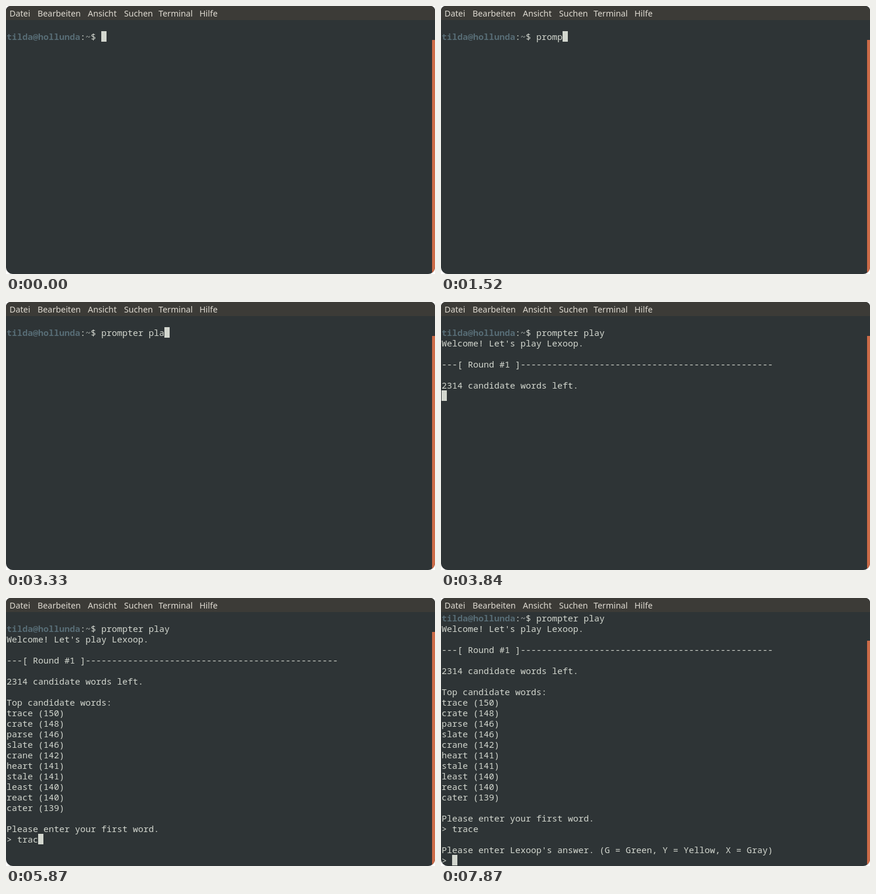
These frames come from a looping animation (734 by 458 pixels, 8000 ms). An HTML page with a canvas:

```html
<!DOCTYPE html>
<html lang="de">
<head>
<meta charset="utf-8">
<title>Terminal</title>
<style>
  html, body { margin: 0; width: 734px; height: 458px; overflow: hidden; background: #fff; }
  canvas { display: block; }
</style>
</head>
<body>
<canvas id="stage" width="734" height="458"></canvas>
<script>
const ctx = document.getElementById('stage').getContext('2d');
const LOOP = 8000, CELL = 9, ROW = 18, TOP = 25;
const MONO = '15px "Noto Sans Mono", monospace';
const TEXT = '#d3d7cf', PROMPT = '#576c75';

const MENU = [['Datei', 6], ['Bearbeiten', 54], ['Ansicht', 140],
              ['Suchen', 202], ['Terminal', 261], ['Hilfe', 331]];
const HOST = 'tilda@hollunda';

// Moment of each key press
const COMMAND = 'prompter play';
const COMMAND_KEYS = [760, 1010, 1260, 1520, 1520, 1780, 2040, 2300, 2560, 2820, 3070, 3330, 3580];
const GUESS = 'trace';
const GUESS_KEYS = [5100, 5350, 5600, 5860, 6120];
const START = 3840, LIST = 4100, ANSWER = 6370;

// Spans in which the cursor is blinked off
const HIDDEN = [[510, 760], [4600, 5100], [7120, 7870]];

const WELCOME = ["Welcome! Let's play Lexoop.", '',
  '---[ Round #1 ]' + '-'.repeat(48), '', '2314 candidate words left.', ''];
const CANDIDATES = ['Top candidate words:',
  'trace (150)', 'crate (148)', 'parse (146)', 'slate (146)', 'crane (142)',
  'heart (141)', 'stale (141)', 'least (140)', 'react (140)', 'cater (139)',
  '', 'Please enter your first word.'];
const QUESTION = ['', "Please enter Lexoop's answer. (G = Green, Y = Yellow, X = Gray)", '> '];

const typed = (word, keys, t) => word.slice(0, keys.filter(k => t >= k).length);

function screenLines(t) {
  const lines = ['', HOST + ':~$ ' + typed(COMMAND, COMMAND_KEYS, t)];
  if (t >= START) lines.push(...WELCOME);
  if (t >= LIST) lines.push(...CANDIDATES, '> ' + typed(GUESS, GUESS_KEYS, t));
  else if (t >= START) lines[lines.length - 1] = '';
  if (t >= ANSWER) lines.push(...QUESTION);
  return lines;
}

function box(color, x, y, w, h) {
  ctx.fillStyle = color;
  ctx.fillRect(x, y, w, h);
}

function write(text, col, row, color = TEXT, weight = '') {
  ctx.font = weight + MONO;
  ctx.fillStyle = color;
  ctx.fillText(text, 1 + col * CELL, TOP + row * ROW + 15);
}

function writePrompt(line, row) {
  const n = HOST.length;
  write(HOST, 0, row, PROMPT, 'bold ');
  write(':', n, row);
  write('~', n + 1, row, '#a4aaa7');
  write(line.slice(n + 2), n + 2, row);
}

function draw(t) {
  const lines = screenLines(t);
  const scroll = Math.max(0, lines.length - 24);

  ctx.clearRect(0, 0, 734, 458);
  ctx.save();
  ctx.beginPath();
  ctx.roundRect(0, 0, 734, 458, [8, 8, 12, 12]);
  ctx.clip();
  box('#2e3436', 0, 0, 734, 458);
  box('#3c3b37', 0, 0, 734, 24);
  box('#cc6b48', 729, scroll ? 73 : 58, 5, 400);

  ctx.font = '14.3px "Noto Sans", sans-serif';
  ctx.fillStyle = '#dfdbd2';
  for (const [label, x] of MENU) ctx.fillText(label, x, 18);

  lines.slice(scroll).forEach((line, row) => {
    if (line.startsWith(HOST)) writePrompt(line, row);
    else write(line, 0, row);
  });

  if (!HIDDEN.some(([from, to]) => t >= from && t < to)) {
    const last = lines.length - 1;
    box(TEXT, 1 + lines[last].length * CELL, TOP + (last - scroll) * ROW, CELL, ROW);
  }
  ctx.restore();
}

function tick() {
  draw(performance.now() % LOOP);
  requestAnimationFrame(tick);
}
tick();
</script>
</body>
</html>
```
